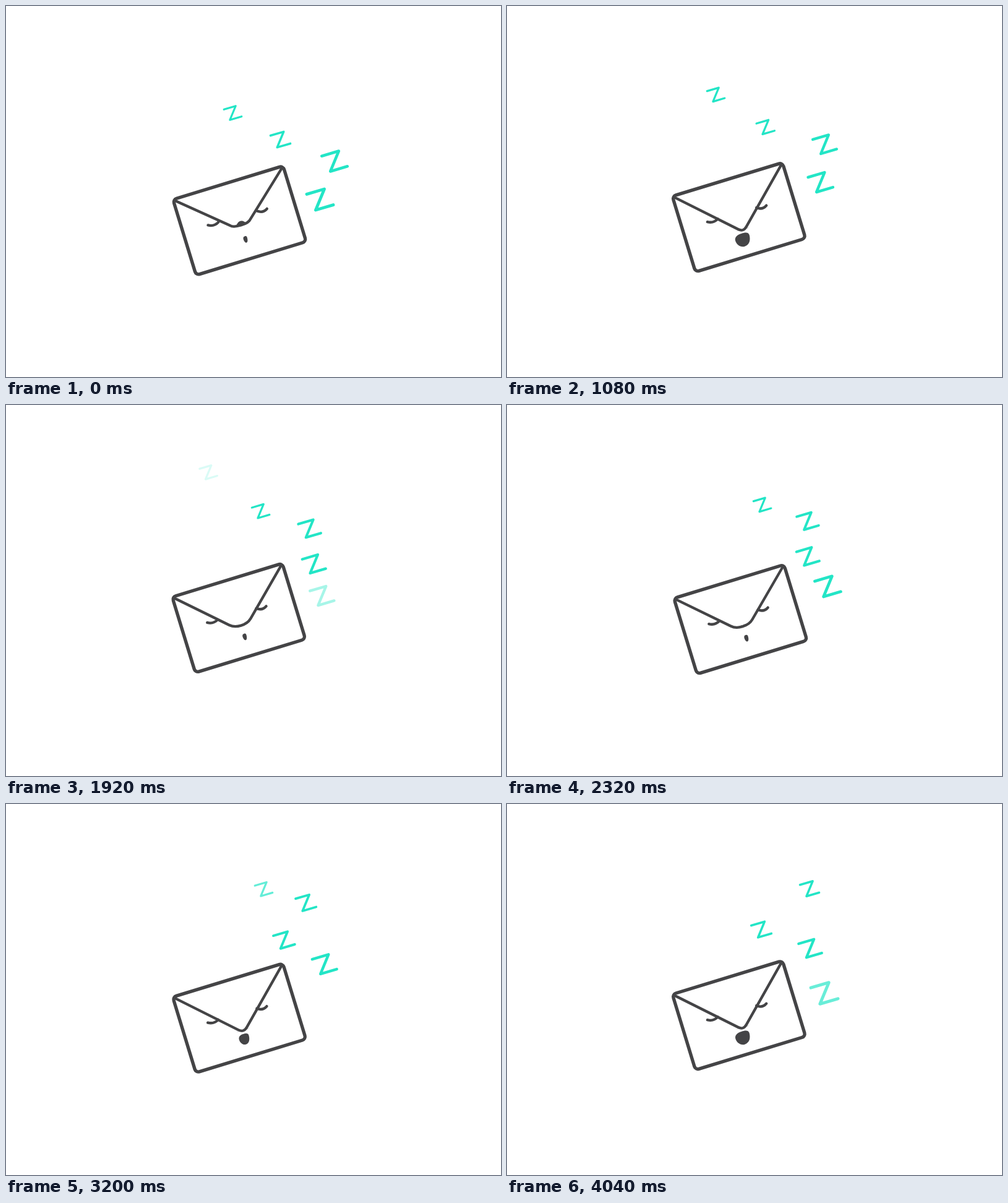
These frames come from a looping animation (800x600 px, 4.08 s). An HTML page with a canvas:

```html
<!DOCTYPE html>
<html lang="en">
<head>
<meta charset="utf-8">
<title>Sleeping envelope</title>
<style>
  html, body { margin: 0; width: 100%; height: 100%; overflow: hidden; background: #fff; }
  canvas { display: block; }
</style>
</head>
<body>
<canvas id="stage" width="800" height="600"></canvas>
<script>
const ctx = document.getElementById('stage').getContext('2d');
const LOOP = 4080, TICK = 40, STEP = 96, BREATH = 3000, GAP = 1008;
const INK = '#444446', MINT = '#23e5c6';
const MOUTH = new Path2D('M-12-2C-12-8-6-10.8 1-10.5C8-11 13-9 12.4-4C12 4 8 11 0 11C-7 11-12 5-12-2Z');
const EYES = new Path2D('M-51-7.8Q-42-2.5-33.5-7.5M31.5-6.5Q40 0 48-5.3');
const LETTER = new Path2D('M-.5-.2L.163-.395L-.163.395L.5.2');

// Each path point is one GAP after the previous one
const letters = [
  { size: 28.5, end: 2035, path: [[366.5, 173], [338.5, 145], [326, 105]] },
  { size: 32, end: 3660, path: [[443.5, 216], [418.5, 197], [411.5, 169], [417, 142], [408, 110]] },
  { size: 41.5, path: [[531, 251], [514.5, 225], [489, 197], [484.5, 164], [489, 137]] },
  { size: 43, path: [[507.5, 313], [507, 286.5], [495.5, 254], [455.5, 223.5], [411, 203]] },
  { size: 48, start: 1760, path: [[468, 340], [513.5, 305], [517, 264], [490, 233.5]] },
  { size: 56.5, start: 3760, path: [[468, 340], [513, 306]] }
];

// 0 before a, 1 after b
const ramp = (t, a, b) => Math.max(0, Math.min(1, (t - a) / (b - a)));

// Smooth curve through evenly timed points
function spline(points, u) {
  const last = points.length - 1;
  const i = Math.min(Math.floor(u), last - 1), f = u - i, s = f * f * (3 - 2 * f);
  const slope = (n, axis) => {
    const a = Math.max(0, n - 1), b = Math.min(last, n + 1);
    return (points[b][axis] - points[a][axis]) / (b - a);
  };
  return [0, 1].map(axis =>
    points[i][axis] * (1 - s) + points[i + 1][axis] * s +
    f * (1 - f) * (slope(i, axis) * (1 - f) - slope(i + 1, axis) * f));
}

function drawFlap(phase) {
  const snap = ramp(phase, 0, 170);
  const point = snap * (1 - ramp(phase, 1250, 1850));
  const lift = ramp(phase, 2200, BREATH) + 1 - snap;
  const half = 18 - 11 * point - lift, top = 6.5 + 11.5 * point - 3.3 * lift;
  const cx = 9 - 7 * point + 3 * lift, cy = 14.8 + 7.9 * point - 5.4 * lift;
  ctx.lineWidth = 4.3;
  ctx.beginPath();
  ctx.moveTo(-90, -61);
  ctx.lineTo(-half, top);
  ctx.bezierCurveTo(-cx, cy, cx, cy, half, top);
  ctx.lineTo(90, -61);
  ctx.stroke();

  // Lip that curls up as the breath goes out
  const base = (top + cy) / 2 + .3, peak = base - 5.4 * lift;
  ctx.beginPath();
  ctx.moveTo(-11, base);
  ctx.bezierCurveTo(-5, base - .5, -5, peak, 1, peak);
  ctx.bezierCurveTo(7, peak, 6, base - .5, 12, base);
  ctx.fill();
}

function drawMouth(phase) {
  const close = 1 - ramp(phase, 1250, 1800);
  const open = ramp(phase, 0, 170) * close, wide = ramp(phase, 480, 1060) * close;
  ctx.translate(.3 - 2.5 * open - 2.5 * wide, 32 + 3 * open + 1.8 * wide);
  ctx.scale(.27 + .43 * open + .3 * wide, .5 + .3 * open + .2 * wide);
  ctx.fill(MOUTH);
}

function drawEnvelope(t) {
  const phase = t % BREATH;
  const sink = Math.cos(2 * Math.PI * (t - 2690) / BREATH);
  ctx.save();
  ctx.translate(376.3 + 1.5 * sink, 344.6 + 3 * sink);
  ctx.rotate(-17 * Math.PI / 180);
  ctx.strokeStyle = ctx.fillStyle = INK;
  ctx.lineWidth = 5.4;
  ctx.beginPath();
  ctx.roundRect(-93, -64, 186, 128, 6);
  ctx.stroke();
  drawFlap(phase);
  ctx.stroke(EYES);
  drawMouth(phase);
  ctx.restore();
}

function drawLetter({ size, path, start = -400, end = Infinity }, t) {
  if (t <= start || t >= end) return;
  const shown = ramp(t, start, start + 400);
  const scale = Math.max(28.5, size - 2.6 * t / 1000) * (.85 + .15 * shown);
  const first = Math.max(0, Math.floor(start / GAP));
  ctx.save();
  ctx.globalAlpha = shown * Math.min(1, (end - t) / 700);
  ctx.translate(...spline(path, t / GAP - first));
  ctx.scale(scale, scale);
  ctx.lineWidth = .113;
  ctx.strokeStyle = MINT;
  ctx.stroke(LETTER);
  ctx.restore();
}

function render() {
  const tick = Math.floor(performance.now() % LOOP / TICK) * TICK;
  const t = Math.floor(tick / STEP) * STEP;
  ctx.clearRect(0, 0, 800, 600);
  ctx.lineCap = ctx.lineJoin = 'round';
  drawEnvelope(t);
  letters.forEach(letter => drawLetter(letter, t));
  requestAnimationFrame(render);
}
render();
</script>
</body>
</html>
```
